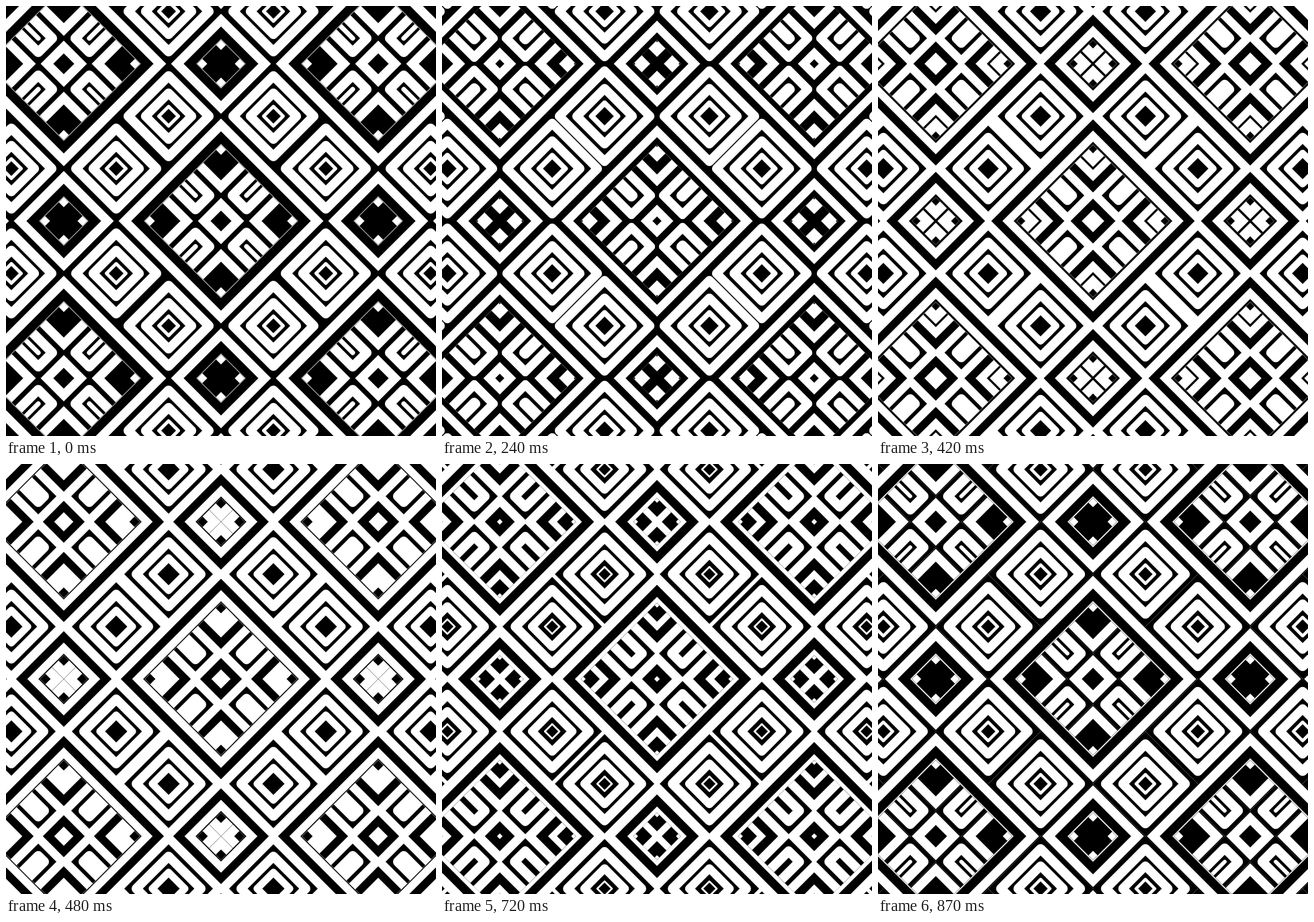
An HTML page that plays this animation: 640 by 640 pixels, repeating every 0.9 s.

```html
<!DOCTYPE html>
<html lang="en">
<head>
<meta charset="utf-8">
<title>Diamond weave</title>
<style>
html, body { margin: 0; width: 100%; height: 100%; overflow: hidden; background: #000; }
svg.stage { display: block; width: 100vw; height: 100vh; }
</style>
</head>
<body>
<svg class="stage" viewBox="0 0 640 640">
  <rect id="back" width="640" height="640"/>
  <defs><g id="tile"></g></defs>
  <g id="field"></g>
</svg>
<script>
const LOOP = 900, STEP = 30;
const INK = ['#fff', '#000'];
const UNIT = 78;       // half diagonal of one cell
const THIRD = 38;      // half diagonal of the middle of the large motif
const BIG = 113.5, SMALL = 35.5;   // half diagonals of the framed areas

// Start time (ms) and speed (px per ms) of the white and the black fronts.
const RIM = [{ at: 295, speed: 0.037 }, { at: 815, speed: 0.042 }];
const TIP = [{ at: 550, speed: 0.043 }, { at: 175, speed: 0.052 }];

const tile = document.getElementById('tile');
const back = document.getElementById('back');

// The tile is drawn in diagonal axes: half a side equals half a diagonal on stage.
const place = (x, y, body) =>
  `<g transform="matrix(.5 .5 -.5 .5 ${x} ${y})">${body}</g>`;

const box = (x0, y0, x1, y1, ink, r = 0) =>
  `<rect x="${x0}" y="${y0}" width="${x1 - x0}" height="${y1 - y0}" rx="${r}" fill="${INK[ink]}"/>`;

const square = (h, ink, r) => h > 0 ? box(-h, -h, h, h, ink, r) : '';

const clip = (x0, y0, x1, y1, body) => {
  const w = x1 - x0, h = y1 - y0;
  return `<svg x="${x0}" y="${y0}" width="${w}" height="${h}" viewBox="${x0} ${y0} ${w} ${h}">${body}</svg>`;
};

const turns = body => [0, 90, 180, 270].map(a => `<g transform="rotate(${a})">${body}</g>`).join('');

// Colour fronts that have not yet travelled the given reach, youngest first.
function fronts(t, kinds, reach) {
  const list = [];
  kinds.forEach(({ at, speed }, ink) => {
    for (let age = (t - at + LOOP) % LOOP; age * speed < reach; age += LOOP)
      list.push({ age, ink, d: age * speed });
  });
  return list.sort((a, b) => a.age - b.age);
}

// Growing rings: white with round corners outside, sharp inside.
const holes = [[-0.4, 7], [0, 11], [0.53, 16.5], [1, 25], [2, 50], [3, 80]];

function hole(a) {
  let i = 1;
  while (i < holes.length - 1 && a > holes[i][0]) i++;
  const [a0, b0] = holes[i - 1], [a1, b1] = holes[i];
  return b0 + (b1 - b0) * (a - a0) / (a1 - a0);
}

function rings(t) {
  return [2, 1, 0, -1]
    .map(k => t / LOOP + k)
    .filter(a => a > -0.4)
    .map(a => {
      const outer = 18 + 26 * a, inner = hole(a);
      return { outer, inner, r: (outer - inner) / 2 };
    });
}

// Colour behind the rings once the outermost one has filled its cell.
const ground = list => list[0].outer > UNIT + 3 && list[0].inner < UNIT ? 0 : 1;

function target(list) {
  const body = square(UNIT, ground(list)) +
    list.map(g => square(g.outer, 0, g.r) + square(g.inner, 1)).join('');
  return clip(-UNIT, -UNIT, UNIT, UNIT, body);
}

// Squares that shrink from the rim.
function shrink(size, list) {
  return square(size, list[0].ink) +
    list.map(f => square(size - f.d, 1 - f.ink)).join('');
}

const tips = (end, list) => list.slice().reverse()
  .map(f => box(end - f.d, end - f.d, end, end, f.ink)).join('');

const hairline = (h, ink) =>
  `<rect x="${-h}" y="${-h}" width="${2 * h}" height="${2 * h}" fill="none" ` +
  `stroke="${INK[ink]}" stroke-width="1.2" stroke-opacity=".25"/>`;

function arch(list) {
  const finger = (h, ink, r) =>
    h > 0 ? box(2 * THIRD - h, -h, 300, h, ink, Math.min(r, h)) : '';
  const body = box(THIRD, -THIRD, BIG, THIRD, ground(list)) +
    list.map(g => finger(g.outer - 39, 0, g.r) + finger(g.inner - 39, 1, 0)).join('');
  return clip(THIRD, -THIRD, BIG, THIRD, body);
}

function chevron(t) {
  const list = fronts(t, RIM, 40);
  const body = box(THIRD, THIRD, BIG, BIG, list[0].ink) +
    list.map(f => box(THIRD + f.d, THIRD + f.d, BIG, BIG, 1 - f.ink)).join('');
  return clip(THIRD, THIRD, BIG, BIG, body + tips(BIG, fronts(t, TIP, 36)));
}

function draw(t) {
  const list = rings(t);
  const rim = fronts(t, RIM, 2 * UNIT - BIG);
  const corner = fronts(t, TIP, 36);
  const line = rim[rim.length - 1].ink;
  const rest = 1 - corner[corner.length - 1].ink;

  const large = shrink(2 * UNIT, rim) + square(BIG, rim[0].ink) +
    turns(arch(list) + chevron(t)) +
    shrink(THIRD, fronts(t, RIM, THIRD)) + hairline(BIG, line);

  const little = shrink(UNIT, rim) + square(SMALL, rest) +
    turns(clip(0, 0, SMALL, SMALL, tips(SMALL, corner))) + hairline(SMALL, line);

  const ring = target(list);
  back.setAttribute('fill', INK[rim[0].ink]);
  tile.innerHTML =
    [[-78, -156], [78, -156], [-156, -78], [156, -78]].map(([x, y]) => place(x, y, ring)).join('') +
    place(0, -234, little) + place(0, 0, large);
}

let copies = '';
for (let i = -2; i <= 2; i++)
  for (let j = -2; j <= 2; j++)
    if ((i + j) % 2 === 0) copies += `<use href="#tile" x="${320 + 234 * i}" y="${320 + 234 * j}"/>`;
document.getElementById('field').innerHTML = copies;

const start = performance.now();
let shown = -1;

function tick() {
  const t = Math.floor(((performance.now() - start) % LOOP) / STEP) * STEP;
  if (t !== shown) draw(shown = t);
  requestAnimationFrame(tick);
}
tick();
</script>
</body>
</html>
```
